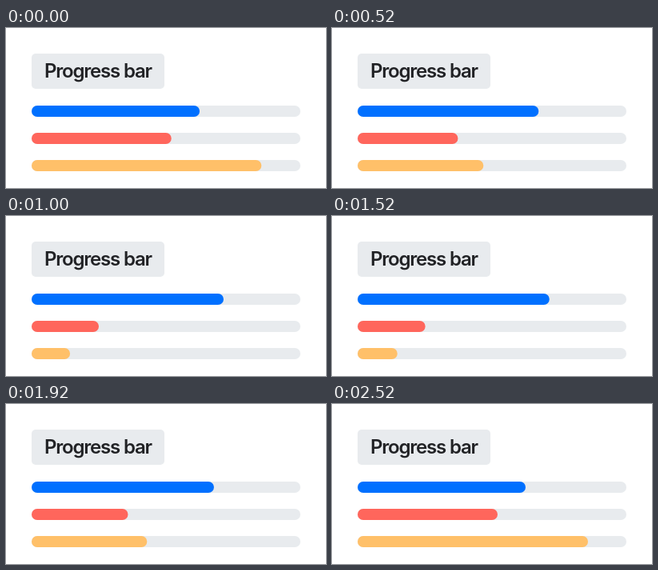
An HTML page for the animation above (3000 ms loop, 400x200 px).

```html
<!DOCTYPE html>
<html lang="en">
<head>
<meta charset="utf-8">
<title>Progress bar</title>
<style>
  html, body { margin: 0; width: 100%; height: 100%; overflow: hidden; background: #fff; }
  svg { display: block; width: 400px; height: 200px; }
  .base { fill: #e8ebee; }
  text { font: 600 24px Inter, sans-serif; letter-spacing: -0.05em; fill: #212225; }
</style>
</head>
<body>
<svg id="stage" viewBox="0 0 400 200">
  <rect class="base" x="32" y="32" width="166" height="44" rx="5"/>
  <text x="48" y="62">Progress bar</text>
</svg>
<script>
const LOOP = 3000, STEP = 40, MOVE = 1042, LEAD = 32;
const stage = document.getElementById('stage');

function addBar(y, width) {
  const bar = document.createElementNS('http://www.w3.org/2000/svg', 'rect');
  const attrs = { x: 32, y, width, height: 14, rx: 7 };
  for (const name in attrs) bar.setAttribute(name, attrs[name]);
  return stage.appendChild(bar);
}

const bars = [
  { y: 97, color: '#0070ff', from: 210, to: 240 },
  { y: 131, color: '#ff665c', from: 175, to: 84 },
  { y: 165, color: '#ffc069', from: 288, to: 48 }
];
for (const bar of bars) {
  addBar(bar.y, 336).setAttribute('class', 'base');
  bar.fill = addBar(bar.y, bar.from);
  bar.fill.setAttribute('fill', bar.color);
}

function ease(t) {
  const u = Math.min(t / MOVE, 1);
  return u * u * (3 - 2 * u);
}

// Each half of the loop is one eased move followed by a rest.
function draw(now) {
  const time = Math.floor(now % LOOP / STEP) * STEP;
  const phase = (time + LEAD) % LOOP, half = LOOP / 2;
  const p = phase < half ? ease(phase) : 1 - ease(phase - half);
  for (const { fill, from, to } of bars) fill.setAttribute('width', from + (to - from) * p);
}

const start = performance.now();
function tick() {
  draw(performance.now() - start);
  requestAnimationFrame(tick);
}
tick();
</script>
</body>
</html>
```
